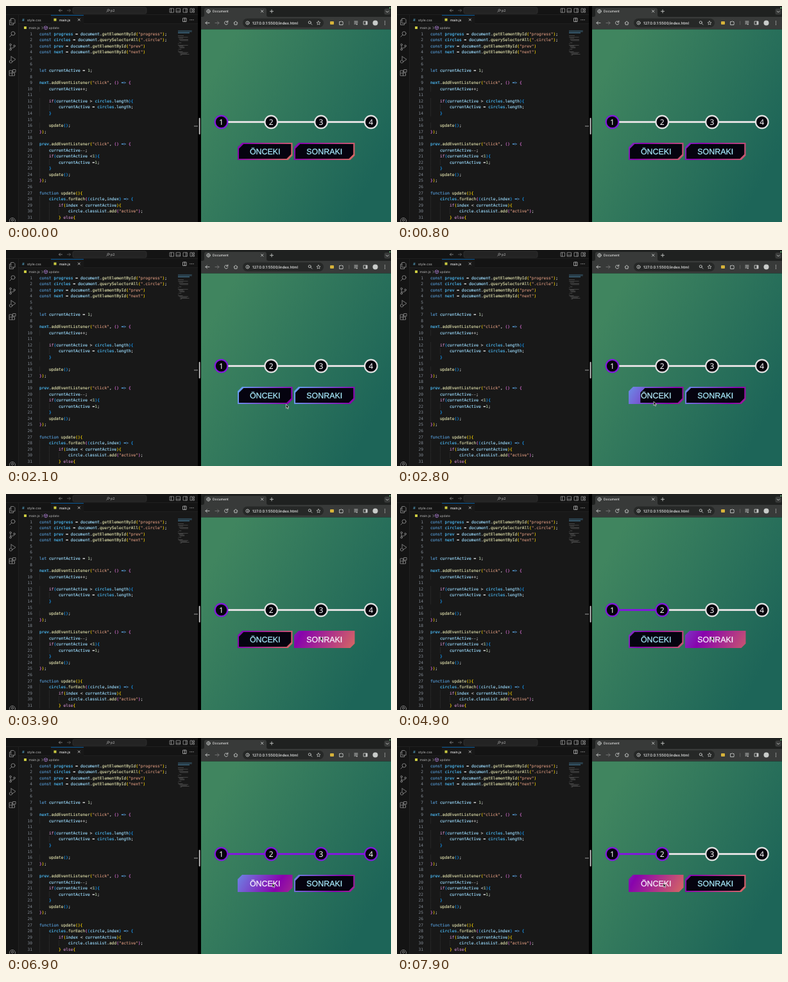
These frames come from a looping animation (600x338 px, 8000 ms). An HTML page:

```html
<!DOCTYPE html>
<html lang="tr">
<head>
<meta charset="utf-8">
<title>Document</title>
<style>
html, body { margin: 0; width: 100%; height: 100%; overflow: hidden; background: #000; }
svg { display: block; width: 600px; height: 338px; }
text { white-space: pre; text-rendering: geometricPrecision; }
.ui { font-family: Inter, Roboto, sans-serif; font-weight: 500; }
.mono { font-family: "DejaVu Sans Mono", "Liberation Mono", monospace; stroke-width: .15; }
.btn { font-family: "Liberation Sans", Arial, sans-serif; stroke-width: .25; }
.num { font-family: "Noto Sans", "Open Sans", sans-serif; font-weight: 500; }
.icon { fill: none; stroke-width: .9; stroke-linecap: round; stroke-linejoin: round; }
</style>
</head>
<body>
<svg id="stage" viewBox="0 0 600 338"></svg>
<script>
const LOOP = 8000;
const stage = document.getElementById("stage");

const rect = (x, y, w, h, fill, extra = "") =>
  `<rect x="${x}" y="${y}" width="${w}" height="${h}" fill="${fill}" ${extra}/>`;
const circle = (x, y, r, extra) => `<circle cx="${x}" cy="${y}" r="${r}" ${extra}/>`;
const label = (x, y, size, fill, text, cls = "ui", extra = "") =>
  `<text x="${x}" y="${y}" font-size="${size}" fill="${fill}" class="${cls}" ${extra}>${text}</text>`;
const icon = (d, color = "#858585", extra = "") =>
  `<path class="icon" stroke="${color}" d="${d}" ${extra}/>`;
const ring = (x, y, r, color = "#858585") => circle(x, y, r, `class="icon" stroke="${color}"`);
const lens = (x, y, r, color) => ring(x, y, r, color) + icon(`M${x - r * .7} ${y + r * .7}l${-r} ${r}`, color);
const escapeText = s => s.replace(/&/g, "&amp;").replace(/</g, "&lt;").replace(/>/g, "&gt;");

// ---------- code editor ----------
const code = `const progress = document.getElementById("progress");
const circles = document.querySelectorAll(".circle");
const prev = document.getElementById("prev")
const next = document.getElementById("next")


let currentActive = 1;

next.addEventListener("click", () => {
    currentActive++;

    if(currentActive > circles.length){
        currentActive = circles.length;
    }

    update();
});

prev.addEventListener("click", () => {
    currentActive--;
    if(currentActive <1){
        currentActive =1;
    }
    update();
});

function update(){
    circles.forEach((circle,index) => {
        if(index < currentActive){
            circle.classList.add("active");
        } else{`.split("\n");

const BRACKETS = ["#ffd700", "#da70d6", "#179fff"];
let depth = 0;

function tokenColor(token, rest) {
  if (/^[({]/.test(token)) return BRACKETS[depth++ % 3];
  if (/^[)}]/.test(token)) return BRACKETS[--depth % 3];
  if (/^"/.test(token)) return "#ce9178";
  if (/^(const|let|function|=>)$/.test(token)) return "#569cd6";
  if (/^(if|else)$/.test(token)) return "#c586c0";
  if (/^\d/.test(token)) return "#b5cea8";
  if (/^\w/.test(token)) {
    if (rest[0] === "(") return "#dcdcaa";
    return /^(progress|circles|prev|next)$/.test(token) ? "#4fc1ff" : "#9cdcfe";
  }
  return "#d4d4d4";
}

function codeLine(line, i) {
  const y = 45.5 + i * 9.58;
  const indent = line.search(/\S/);
  let spans = "", at = 0, out = "";
  for (const token of line.match(/"[^"]*"|\w+|=>|[(){}]|\s+|[^\w\s(){}"]/g) || []) {
    at += token.length;
    const color = tokenColor(token, line.slice(at));
    spans += /^\s/.test(token) ? token
      : `<tspan fill="${color}" stroke="${color}">${escapeText(token)}</tspan>`;
  }
  for (let k = 0; k < indent; k += 4) out += rect(52 + k * 3.757, y - 7, .5, 9.6, "#fff", 'opacity=".12"');
  out += label(41, y, 6.2, "#858d97", i + 1, "mono", 'text-anchor="end"');
  return out + label(52, y, 6.24, "#d4d4d4", spans, "mono");
}

function minimap() {
  return code.map((line, i) => {
    const start = Math.max(0, line.search(/\S/));
    return line ? rect(268 + start * .4, 38.5 + i * 1.26, (line.length - start) * .41, .7,
      i < 4 ? "#4d87a8" : "#717171", 'opacity=".75"') : "";
  }).join("");
}

function editor() {
  return rect(0, 0, 300, 338, "#181818") + rect(0, 0, 300, 28, "#141414") + rect(0, 14, 19, 324, "#141414") +
    rect(0, 13.5, 300, .5, "#2b2b2b") + rect(19, 14, .5, 324, "#2b2b2b") + rect(19, 27.5, 281, .5, "#2b2b2b") +
    rect(70, 14, 51, 14, "#181818") + rect(70, 14, 51, .7, "#0078d4") +
    // title bar
    icon("M87.5 7h-5m2-2l-2 2l2 2") + icon("M95.5 7h5m-2-2l2 2l-2 2", "#5a5a5a") +
    rect(104, 2, 115, 10, "#232323", 'rx="2.5" stroke="#3a3a3a" stroke-width=".6"') +
    lens(159.5, 6.6, 1.6, "#909090") + label(163, 9.3, 5.4, "#a0a0a0", "p2") +
    icon("M255.5 4h6v6h-6zM257.5 4v6M265.5 4h6v6h-6zM265.5 8h6M276.5 4h6v6h-6zM280.5 4v6M287.5 4h2.5v6h-2.5zM291.5 4h2v2.5h-2zM291.5 8h2v2h-2z", "#a8a8a8", 'style="stroke-width:.7"') +
    // tabs and breadcrumb
    label(25, 24, 6, "#519aba", "#") + label(33, 23.5, 5.1, "#a8a8a8", "style.css") +
    rect(74.5, 19.5, 4, 4, "#cbcb41") + label(83, 23.5, 5.1, "#f0f0f0", "main.js") +
    icon("M112.3 20l3 3m0-3l-3 3", "#ccc") +
    icon("M276 19h5v5.5h-5zM278.5 19v5.5", "#aaa") +
    [287, 289.5, 292].map(x => circle(x, 21.7, .6, 'fill="#bbb"')).join("") +
    rect(28, 32, 4, 4, "#cbcb41") + label(35.5, 36, 5.1, "#a0a0a0", "main.js") +
    icon("M56 32.5l1.5 1.7l-1.5 1.7", "#888") +
    icon("M62 31.5l2.5 1.2v3l-2.5 1.2l-2.5-1.2v-3zM59.5 32.7l2.5 1.2l2.5-1.2M62 34v2.5", "#b180d7", 'style="stroke-width:.7"') +
    label(66.5, 36, 4.9, "#a0a0a0", "update") +
    // activity bar
    icon("M8 19.5h4l2 2v5.5h-6zM8 22h-2.5v7.5h6v-2.5") + lens(11, 43, 3, "#858585") +
    ring(7, 60.5, 1.4) + ring(7, 68, 1.4) + ring(13, 62.5, 1.4) +
    icon("M7 62v4.5M13 64q0 2-6 2M8 79l7 4.5l-5 3.5M8 79v5") + ring(7.5, 87, 2.2) +
    icon("M5.5 101h4v4h4v4h-8zM5.5 105h4v4M11 99.5h4v4h-4z") +
    ring(10, 336, 4.5) + ring(10, 335, 1.6) +
    code.map(codeLine).join("") + minimap() +
    rect(293, 187.5, 6, 1, "#a0a0a0");
}

// ---------- browser ----------
function browser() {
  const grey = "#c7c9c8";
  return rect(299, 0, 5, 338, "#000") + rect(300.7, 175, 1.8, 26, "#c8c8c8", 'rx=".9"') +
    rect(304, 0, 296, 18, "#1f2120") + rect(304, 17, 296, 19.5, "#383a39") +
    // tab strip
    `<path d="M306 17q3 0 3-3v-8q0-3 3-3h91q3 0 3 3v8q0 3 3 3z" fill="#383a39"/>` +
    ring(315.5, 8.3, 2.7, grey) + icon("M313 8.3h5M315.5 5.6v5.4", grey, 'style="stroke-width:.6"') +
    label(322, 10.3, 5, "#e6e6e6", "Document") +
    icon("M397.5 6.5l3.4 3.4m0-3.4l-3.4 3.4M411.5 8.3h5m-2.5-2.5v5", grey) +
    rect(589.5, 4, 9.5, 9.5, "#383a39", 'rx="2.5"') + icon("M592.3 8l2 2l2-2", grey) +
    circle(598.3, 3, 1, 'fill="#6fd28a"') +
    // toolbar
    icon("M317 26.5h-6m2.5-2.5l-2.5 2.5l2.5 2.5", grey) +
    icon("M326 26.5h6m-2.5-2.5l2.5 2.5l-2.5 2.5", "#777") +
    icon("M345.5 25a2.7 2.7 0 1 0 .2 2.5M345.8 23v2.3h-2.3", grey) +
    icon("M355 26.5l3-2.7l3 2.7M356 26v3.2h4v-3.2", grey) +
    rect(369, 19.5, 126, 14, "#262827", 'rx="7"') +
    ring(376.5, 26.5, 2.6, grey) + icon("M376.5 26.3v1.4M376.5 25v.1", grey) +
    label(384, 28.7, 5.9, "#eeeeee", "127.0.0.1:5500/index.html") +
    ring(473.3, 25.7, 2, grey) + icon("M474.8 27.2l2 2", grey) +
    icon("M487 23.5l.9 2l2.1.2l-1.6 1.4l.5 2.1l-1.9-1.1l-1.9 1.1l.5-2.1l-1.6-1.4l2.1-.2z", grey, 'style="stroke-width:.7"') +
    rect(505, 24, 6, 5, "#d6b23a", 'rx="1"') +
    icon("M520 24.5h1.7q.8-1.8 1.6 0h1.7v1.7q1.5.8 0 1.6v1.7h-5z", grey) +
    rect(534.5, 23.5, .6, 6, "#777") +
    icon("M543 24h5M543 26h5M543 28h2M557.5 24h5.5v5h-5.5z", grey) +
    circle(546.8, 28.5, 1.1, `fill="${grey}"`) + rect(560.5, 24, 2.5, 5, grey) +
    circle(575.5, 26.5, 4, 'fill="#c9ccca"') +
    [24, 26.5, 29].map(y => circle(590.5, y, .7, `fill="${grey}"`)).join("") +
    rect(304, 36.5, 296, 301.5, "url(#page)");
}

// ---------- web page ----------
const TOP = 214, HEIGHT = 27, BORDER = 2;
const buttons = [
  { x: 361, w: 85.5, text: "ÖNCEKI", hover: [[2740, 1], [3250, 0], [6430, 1]] },
  { x: 449, w: 94.5, text: "SONRAKI", hover: [[3300, 1], [6350, 0]] }
];
const centers = [335.5, 413.2, 491, 568.8];
const steps = [[4150, 1], [4950, 2], [5744, 3], [7050, 2], [7450, 1]];
const activeEvents = centers.map((_, i) => steps.map(([t, s]) => [t, +(s >= i)]));

const cutBox = (b, inset) => {
  const w = b.w - 2 * inset, h = HEIGHT - 2 * inset, c = 7;
  return `M${b.x + inset + c} ${TOP + inset}h${w - c}v${h - c}l${-c} ${c}h${c - w}v${c - h}z`;
};

// Gradient axis at 120deg over a box twice the button's width.
function gradient(b, i) {
  const half = (b.w * 2 * .866 + HEIGHT * .5) / 2;
  const cx = b.x + b.w, cy = TOP + HEIGHT / 2;
  return `<linearGradient id="g${i}" gradientUnits="userSpaceOnUse" x1="${cx - .866 * half}" y1="${cy - .5 * half}"
    x2="${cx + .866 * half}" y2="${cy + .5 * half}"><stop stop-color="#65aaf4"/>
    <stop offset=".5" stop-color="#8803ad"/><stop offset="1" stop-color="#dc6e5e"/></linearGradient>
    <clipPath id="c${i}"><path d="${cutBox(b, BORDER)}"/></clipPath>`;
}

const button = (b, i) =>
  `<path d="${cutBox(b, 0)}" fill="url(#g${i})"/>
   <g clip-path="url(#c${i})"><path id="cover${i}" d="${cutBox(b, BORDER)}" fill="#05030f"/></g>` +
  label(b.x + b.w / 2, 232.4, 12.4, "", b.text, "btn", `id="text${i}" text-anchor="middle"`);

stage.innerHTML = `<defs>
  <linearGradient id="page" gradientUnits="userSpaceOnUse" x1="325" y1="100" x2="585" y2="245">
    <stop stop-color="#40855f"/><stop offset="1" stop-color="#1d6558"/></linearGradient>
  ${buttons.map(gradient).join("")}</defs>` +
  editor() + browser() +
  rect(335.5, 180, 233.3, 3, "#dedede") + rect(335.5, 180, 0, 3, "#8118dc", 'id="bar"') +
  centers.map((x, i) => circle(x, 181.5, 9.8, `id="ring${i}" fill="#05030c" stroke-width="2.2"`) +
    label(x, 185.8, 12, "#fff", i + 1, "num", 'text-anchor="middle"')).join("") +
  buttons.map(button).join("") +
  `<path id="cursor" d="M0 0v6.3l1.5-1.3l1.1 2.4l1-.5l-1.1-2.3h2z" fill="#111" stroke="#fff" stroke-width=".6"/>`;

// ---------- motion ----------
// CSS "ease": cubic-bezier(.25, .1, .25, 1)
function ease(x) {
  if (x <= 0) return 0;
  if (x >= 1) return 1;
  let lo = 0, hi = 1;
  const curve = (s, a, b) => 3 * a * s * (1 - s) ** 2 + 3 * b * s * s * (1 - s) + s ** 3;
  for (let i = 0; i < 20; i++) {
    const mid = (lo + hi) / 2;
    if (curve(mid, .25, .25) < x) lo = mid; else hi = mid;
  }
  return curve(lo, .1, 1);
}

const transition = (events, t) =>
  events.reduce((v, [start, goal]) => v + (goal - v) * ease((t - start) / 400), 0);

const mix = (a, b, k) => `rgb(${a.map((v, i) => Math.round(v + (b[i] - v) * k))})`;

const path = [[800, 470, 344], [1400, 458, 241], [1700, 458, 241], [2650, 402, 242], [2800, 400, 237],
  [3150, 408, 232], [3450, 490, 223], [6250, 490, 223], [6550, 415, 227], [8000, 415, 227]];

function cursorAt(t) {
  const i = path.findIndex(p => p[0] > t);
  if (i < 1) return path[0].slice(1);
  const [t0, x0, y0] = path[i - 1], [t1, x1, y1] = path[i];
  const u = (t - t0) / (t1 - t0), k = u * u * (3 - 2 * u);
  return [x0 + (x1 - x0) * k, y0 + (y1 - y0) * k];
}

const $ = id => document.getElementById(id);

function draw(now) {
  const t = now % LOOP;
  const shift = (1 + Math.cos((t - 230) * Math.PI / 2000)) / 2;

  $("bar").setAttribute("width", transition(steps, t) * 77.77);
  centers.forEach((_, i) => {
    const on = i ? transition(activeEvents[i], t) : 1;
    $("ring" + i).setAttribute("stroke", mix([226, 226, 226], [129, 24, 220], on));
  });
  buttons.forEach((b, i) => {
    const fill = transition(b.hover, t);
    const color = mix([170, 238, 255], [250, 247, 255], fill);
    $("g" + i).setAttribute("gradientTransform", `translate(${-shift * b.w} 0)`);
    $("cover" + i).setAttribute("transform", `translate(${b.w * fill} 0)`);
    $("text" + i).setAttribute("fill", color);
    $("text" + i).setAttribute("stroke", color);
  });
  $("cursor").setAttribute("transform", `translate(${cursorAt(t)})`);
  requestAnimationFrame(draw);
}
requestAnimationFrame(draw);
</script>
</body>
</html>
```
